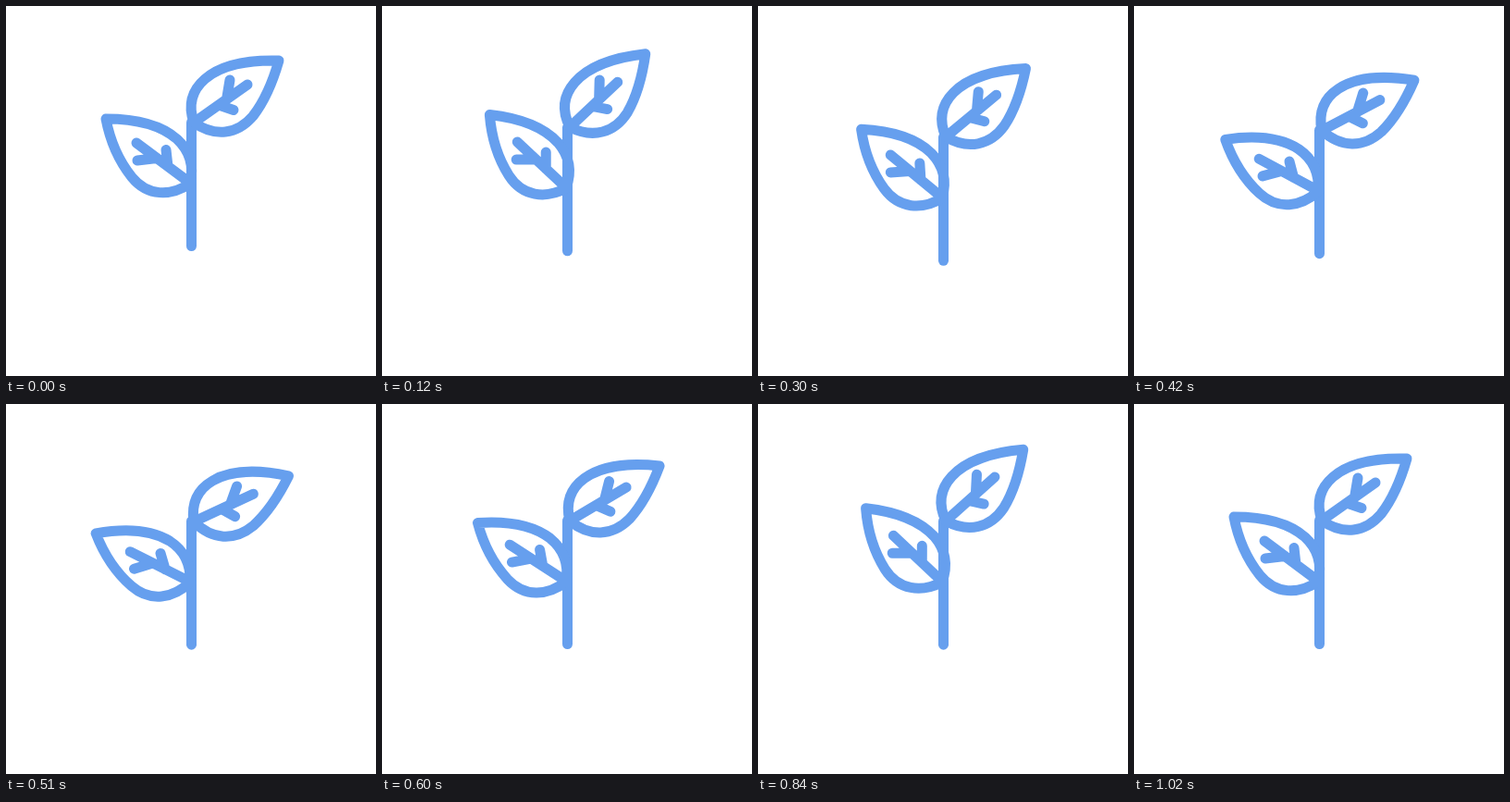
Write an HTML page with a canvas that moves like this. It is 400 px wide and 400 px high and loops after 1.05 s.

```html
<!DOCTYPE html>
<html lang="en">
<head>
<meta charset="utf-8">
<title>Sprout</title>
<style>
  html, body { margin: 0; width: 100%; height: 100%; overflow: hidden; background: #fff; }
  canvas { display: block; width: 100vmin; height: 100vmin; }
</style>
</head>
<body>
<canvas id="stage" width="400" height="400"></canvas>
<script>
const ctx = document.getElementById('stage').getContext('2d');
const LOOP = 1050, STEP = 30;

// Keys are [time in ms, value]; values ease in and out between them.
const drop = [[0, 0], [305, 15.8], [540, 0], [840, 0.7], [1020, 0]];

const rightLeaf = {
  pivot: [200, 126],
  turn: -1,
  lift: [[0, 0], [185, 11], [495, -10.5], [770, 8], [1020, 0]],
  path: new Path2D(
    'M295 59 C262 58 232 64 215 79 C200 92 197 108 203 126 ' +
    'C226 142 250 139 267 119 C281 101 289 80 295 59 Z ' +
    'M203 126 L261 85 M242 80 L238.5 101 M246 112.5 L230 107')
};

const leftLeaf = {
  pivot: [200, 192],
  turn: 1,
  lift: [[0, 0], [188, 9], [483, -10.5], [770, 8], [1020, 0]],
  path: new Path2D(
    'M108 122 C140 122 168 129 185 144 C200 158 203 175 199 192 ' +
    'C178 206 153 206 136 185 C120 165 112 143 108 122 Z ' +
    'M200 192 L141 148 M173 155.5 L175 173.5 M142 167 L163 164.5')
};

const stem = new Path2D('M200.5 126 V259.5');

function valueAt(keys, t) {
  for (let i = 1; i < keys.length; i++) {
    const [t0, a] = keys[i - 1], [t1, b] = keys[i];
    if (t <= t1) {
      const k = (1 - Math.cos(Math.PI * (t - t0) / (t1 - t0))) / 2;
      return a + (b - a) * k;
    }
  }
  return keys[keys.length - 1][1];
}

function drawLeaf(leaf, t) {
  const [x, y] = leaf.pivot;
  ctx.save();
  ctx.translate(x, y);
  ctx.rotate(leaf.turn * valueAt(leaf.lift, t) * Math.PI / 180);
  ctx.translate(-x, -y);
  ctx.stroke(leaf.path);
  ctx.restore();
}

function draw(now) {
  const t = Math.floor((now % LOOP) / STEP) * STEP;
  ctx.fillStyle = '#fff';
  ctx.fillRect(0, 0, 400, 400);
  ctx.save();
  ctx.translate(0, valueAt(drop, t));
  ctx.strokeStyle = '#669fee';
  ctx.lineWidth = 11;
  ctx.lineCap = ctx.lineJoin = 'round';
  ctx.stroke(stem);
  drawLeaf(rightLeaf, t);
  drawLeaf(leftLeaf, t);
  ctx.restore();
}

let start;
function tick(now) {
  if (start === undefined) start = now;
  draw(Math.max(0, now - start));
  requestAnimationFrame(tick);
}
draw(0);
requestAnimationFrame(tick);
</script>
</body>
</html>
```
